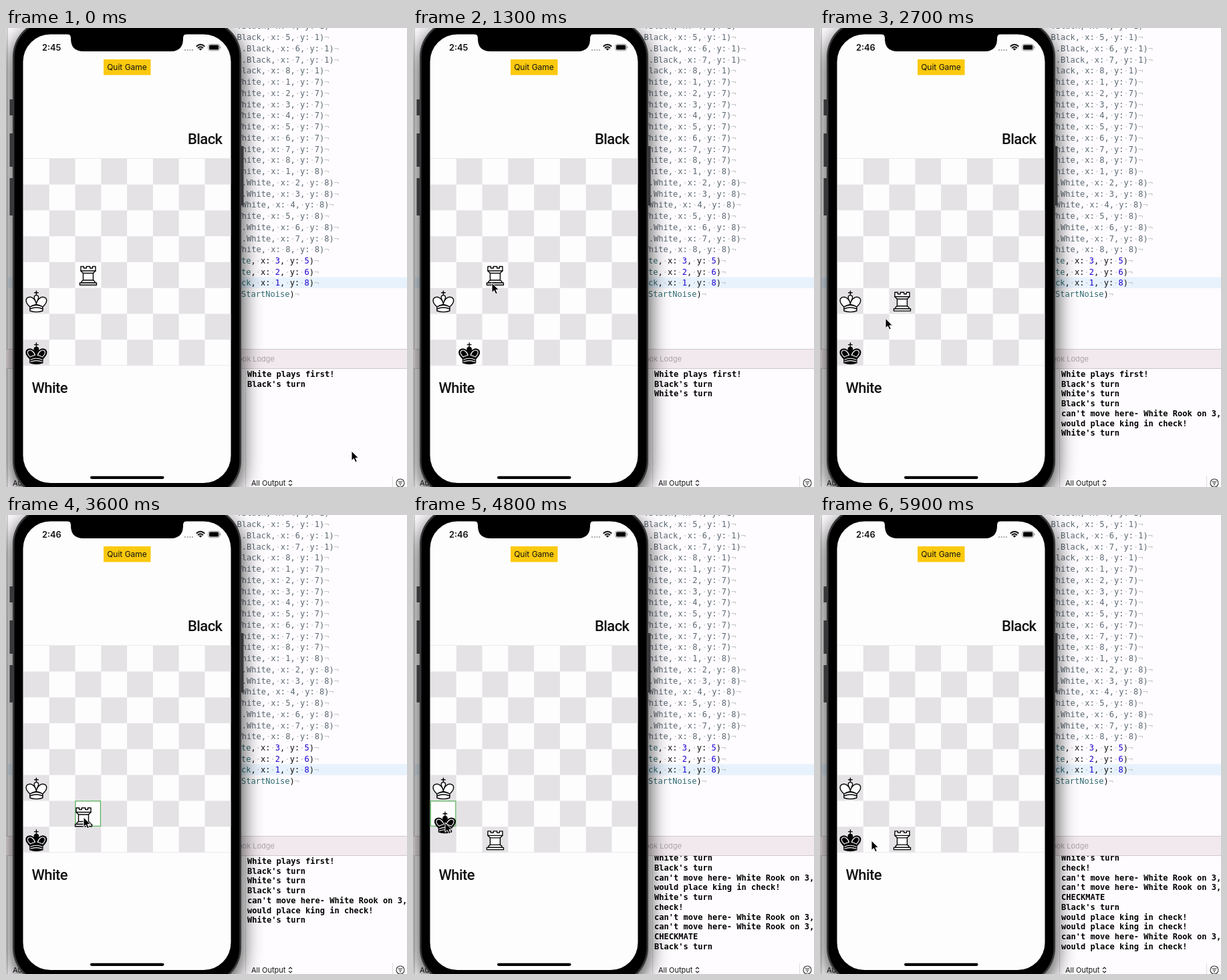
An HTML page for the animation above (6000 ms loop, 600 by 688 pixels).

```html
<!DOCTYPE html>
<html lang="en">
<head>
<meta charset="utf-8">
<title>Chess endgame on a phone</title>
<style>
  html, body { margin: 0; width: 100%; height: 100%; overflow: hidden; background: #fefcfe; }
  svg { display: block; width: 600px; height: 688px; }
  text { font-family: Inter, "Liberation Sans", sans-serif; fill: #111; }
  .code text, .console text { font-family: "DejaVu Sans Mono", "Noto Sans Mono", monospace; font-size: 12.06px; }
  .code text { fill: #5d6974; }
  .code .live { fill: #111; }
  .code .dot { fill: #c3c3c6; }
  .code .num { fill: #1c00cf; }
  .code .type { fill: #326d74; }
  .console text { font-weight: 700; fill: #000; }
  .player { font-family: Roboto, "Open Sans", sans-serif; font-size: 22px; font-weight: 500; letter-spacing: -.6px; }
  .small { font-size: 11px; }
  .line { fill: none; stroke: #000; stroke-width: 1.4; stroke-linejoin: round; stroke-linecap: round; }
  .white { fill: #fff; }
  .black { fill: #000; }
  .inlay { stroke: #fff; stroke-width: 1.1; }
</style>
</head>
<body>
<svg viewBox="0 0 600 688">
  <defs>
    <filter id="blur" x="-30%" y="-20%" width="160%" height="140%"><feGaussianBlur stdDeviation="16"/></filter>
    <clipPath id="consoleClip"><rect x="353" y="511" width="247" height="160"/></clipPath>
    <g id="kingShape">
      <path d="M0-15.8V-9.5M-2.8-13.2H2.8"/>
      <path d="M0 4.5C-.6-1-3.2-3.5-3.2-6A3.2 3.4 0 0 1 3.2-6C3.2-3.5.6-1 0 4.5Z"/>
      <path d="M-9.5 8C-13.5 4.5-15.3 1.5-15.3-1.5C-15.3-6.8-9-8-5.5-5.4C-2.5-3.4-.5-1 0 4.5Q-5 5-9.5 8Z"/>
      <path d="M9.5 8C13.5 4.5 15.3 1.5 15.3-1.5C15.3-6.8 9-8 5.5-5.4C2.5-3.4 .5-1 0 4.5Q5 5 9.5 8Z"/>
      <path d="M-9.5 8Q0 2.6 9.5 8V14Q0 17.2-9.5 14Z"/>
    </g>
  </defs>

  <!-- editor and console -->
  <rect width="600" height="688" fill="#fefcfe"/>
  <rect width="2.5" height="688" fill="#dedcde"/>
  <path d="M2.5 0V688" stroke="#c9c6c9"/>
  <rect x="3" y="373.5" width="597" height="16.5" fill="#e7f2fd"/>
  <g class="code" id="code"></g>
  <rect y="481" width="600" height="29.5" fill="#f1e9ed"/>
  <path d="M0 481.5H600M0 510.5H600" stroke="#d0c9cd"/>
  <path d="M358.5 511V688" stroke="#dedade"/>
  <text x="402" y="500" text-anchor="end" class="small" style="fill:#aaa4a8">Rook Lodge</text>
  <g class="console" id="console" clip-path="url(#consoleClip)"></g>
  <text x="10" y="686" class="small">Auto</text>
  <text x="367" y="686" class="small">All Output</text>
  <path d="M423 680.5l2.5-2.5 2.5 2.5M423 683.5l2.5 2.5 2.5-2.5" fill="none" stroke="#222" stroke-width="1.1"/>
  <path d="M578.5 672V688" stroke="#dedade"/>
  <circle cx="590" cy="682" r="6" fill="none" stroke="#333" stroke-width="1.1"/>
  <path d="M586.5 680H593.5M587.7 682.3H592.3M589 684.6H591" stroke="#333" stroke-width="1.1"/>

  <!-- phone -->
  <rect x="10" y="0" width="342" height="712" rx="55" opacity=".82" filter="url(#blur)"/>
  <path d="M8 107V131M8 158V208M8 225V281" stroke="#37373a" stroke-width="5"/>
  <path d="M353.5 177V266" stroke="#37373a" stroke-width="4"/>
  <rect x="10" y="-12" width="342" height="716" rx="55" fill="#39393b"/>
  <rect x="12.5" y="-9.5" width="337" height="711" rx="53" fill="#000"/>
  <rect x="25.5" y="9.5" width="311" height="672.5" rx="41" fill="#fefdfe"/>
  <path d="M91 9Q97 9 97 15V16Q97 35 116 35H246Q265 35 265 16V15Q265 9 271 9Z"/>
  <text id="clock" x="54" y="33.7" font-size="12.8" font-weight="600"></text>
  <path d="M267 33H280" stroke="#aaa" stroke-width="2" stroke-dasharray="2 1.7"/>
  <path d="M284.7 27.8Q291 21.8 297.3 27.8M287 30.2Q291 26.4 295 30.2" fill="none" stroke="#111" stroke-width="1.9"/>
  <path d="M288.7 31.4Q291 29.6 293.3 31.4L291 33.8Z"/>
  <rect x="302.7" y="24.3" width="16.8" height="9.6" rx="2.8" fill="none" stroke="#999"/>
  <rect x="304" y="25.6" width="14.2" height="7" rx="1.6"/>
  <path d="M320.8 27.5V30.5" stroke="#999" stroke-width="1.2"/>
  <rect x="146" y="47" width="70.5" height="23.5" fill="#fbc90e"/>
  <text x="181" y="63.2" font-size="12" text-anchor="middle">Quit Game</text>
  <text class="player" x="272" y="174">Black</text>
  <text class="player" x="38.5" y="547">White</text>
  <rect x="126" y="671.7" width="110.5" height="4.2" rx="2.1"/>

  <!-- board -->
  <g id="board"></g>
  <path d="M26 195.5H336M26 505.8H336" stroke="#e9e8ea"/>
  <rect id="target" width="37.6" height="37.6" fill="none" stroke="#62b466" stroke-width="1.4"/>
  <g class="line white" transform="translate(45.4 410)">
    <use href="#kingShape"/>
    <path d="M-9.5 11Q0 7 9.5 11" fill="none"/>
  </g>
  <g id="rook" class="line white">
    <path d="M-11-14H-6.5V-11.5H-2.7V-14H2.7V-11.5H6.5V-14H11V-7.5L7.5-4V6.5L10 8.5V10.5H-10V8.5L-7.5 6.5V-4L-11-7.5Z"/>
    <path d="M-12.5 10.5H12.5V13.8H-12.5ZM-11-7.5H11M-7.5-4H7.5M-7.5 6.5H7.5"/>
  </g>
  <g id="king">
    <use href="#kingShape" class="line black"/>
    <g class="line inlay">
      <path d="M-9 5.3C-12 2.7-13.1.4-13.1-1.5C-13.1-4.9-9-5.8-6.4-3.8C-4-2-2.4 0-2 2.7Q-6 3.4-9 5.3Z"/>
      <path d="M9 5.3C12 2.7 13.1.4 13.1-1.5C13.1-4.9 9-5.8 6.4-3.8C4-2 2.4 0 2 2.7Q6 3.4 9 5.3Z"/>
      <path d="M-8.7 9.3Q0 5.4 8.7 9.3M-8.7 12.4Q0 9.2 8.7 12.4"/>
    </g>
  </g>
  <path id="cursor" d="M0 0V14.5L3.4 11.5 5.8 16.8 8.3 15.7 6 10.6H10.5Z" stroke="#fff" stroke-width="1" stroke-linejoin="round"/>
</svg>
<script>
const LOOP = 6000, STEP = 100;
const CELL = 38.78, LEFT = 26, TOP = 195.8;
const CHAR = 7.26;
const byId = id => document.getElementById(id);

function add(parent, tag, attrs, content = "") {
  const el = document.createElementNS("http://www.w3.org/2000/svg", tag);
  for (const key in attrs) el.setAttribute(key, attrs[key]);
  el.innerHTML = content;
  parent.append(el);
  return el;
}

for (let i = 0; i < 64; i++) {
  const col = i % 8, row = i >> 3;
  if ((col + row) % 2) add(byId("board"), "rect",
    { x: LEFT + col * CELL, y: TOP + row * CELL, width: CELL, height: CELL, fill: "#e4e2e5" });
}

// Code listing
const span = (name, text) => `<tspan class="${name}">${text}</tspan>`;
const gap = span("dot", "·");
const codeLine = (i, x, html, name = "") =>
  add(byId("code"), "text", { x, y: 18.2 + i * 16.74, class: name }, html + span("dot", "¬"));
const extra = [0, 2, 2, 1, 0, 2, 2, 0]; // name length beyond four letters

function pieceLine(i, side, x, y) {
  const shift = y === 7 ? 0 : extra[x - 1];
  codeLine(i, 338.3 + shift * CHAR, `.${side}, x: ${x}, y: ${y})`.split(" ").join(gap));
}
for (let x = 4; x <= 8; x++) pieceLine(x - 5, "Black", x, 1);
for (let x = 1; x <= 8; x++) {
  pieceLine(x + 3, "White", x, 7);
  pieceLine(x + 11, "White", x, 8);
}
[["te", 3, 5], ["te", 2, 6], ["ck", 1, 8]].forEach(([end, x, y], i) => {
  codeLine(20 + i, 352, span("type", end) + `,${gap}x:${gap}` + span("num", x)
    + `,${gap}y:${gap}` + span("num", y) + ")", "live");
});
codeLine(23, 352, span("type", "StartNoise") + ")", "live");

// Console output
const LINE = 14.73;
const cant = "can't move here- White Rook on 3, 8";
const would = "would place king in check!";
const output = ["White plays first!", "Black's turn", "White's turn", "Black's turn",
  cant, would, "White's turn", "check!", cant, cant, "CHECKMATE", "Black's turn",
  would, would, cant, would];
const rows = output.map(text => add(byId("console"), "text", { x: 361 }, text));

// Cursor path: step, x, y
const path = [
  [0, 517, 634], [1, 480, 624], [2, 330, 580], [3, 160, 522], [4, 60, 493], [5, 46, 489],
  [7, 82, 487], [9, 83, 486], [10, 94, 462], [12, 115, 393], [13, 118, 382], [15, 119, 376],
  [17, 119, 404], [18, 104, 436], [19, 84, 481], [20, 63, 484], [22, 47, 487], [23, 47, 486],
  [26, 88, 446], [29, 118, 414], [33, 118, 414], [36, 116, 453], [38, 121, 486], [40, 121, 486],
  [44, 56, 484], [45, 56, 484], [48, 48, 461], [49, 48, 466], [50, 52, 478], [52, 76, 452],
  [53, 70, 458], [54, 56, 467], [55, 49, 482], [57, 74, 488], [58, 77, 488], [60, 77, 488]
];

// Drags: piece, lift step, drop step, landing column and row, console lines afterwards
const drags = [
  ["king", 6, 9, 1, 7, 3], ["rook", 16, 18, 2, 5, 4], ["king", 19, 23, 0, 7, 7],
  ["rook", 34, 39, 2, 7, 12], ["king", 46, 49, 0, 7, 13], ["king", 50, 53, 0, 7, 14],
  ["king", 55, 58, 0, 7, 16]
];

function cursorAt(step) {
  const i = path.findIndex(p => p[0] > step);
  const [a, ax, ay] = path[i - 1], [b, bx, by] = path[i];
  const f = (step - a) / (b - a);
  return [ax + (bx - ax) * f, ay + (by - ay) * f];
}

const move = (id, x, y) => byId(id).setAttribute("transform", `translate(${x} ${y})`);

function draw(step) {
  const [cx, cy] = cursorAt(step);
  const home = { king: [0, 7], rook: [2, 4] };
  let lines = 2, held = null;
  for (const [piece, lift, drop, col, row, count] of drags) {
    if (step >= drop) {
      home[piece] = [col, row];
      lines = count;
    } else if (step >= lift) held = piece;
  }

  for (const piece in home) {
    const [col, row] = home[piece];
    if (piece === held) move(piece, cx, cy);
    else move(piece, LEFT + (col + .5) * CELL, TOP + (row + .5) * CELL + 1.2);
  }

  const col = Math.floor((cx - LEFT) / CELL), row = Math.floor((cy - TOP) / CELL);
  const over = held && (col !== home[held][0] || row !== home[held][1]);
  byId("target").style.display = over ? "" : "none";
  move("target", LEFT + col * CELL + .3, TOP + row * CELL + .3);

  const scroll = Math.max(0, (lines - 1) * LINE - 127.7);
  rows.forEach((el, i) => {
    el.setAttribute("y", 523 + i * LINE - scroll);
    el.style.display = i < lines ? "" : "none";
  });
  byId("clock").textContent = step < 26 ? "2:45" : "2:46";
  move("cursor", cx, cy);
}

const start = performance.now();
let last = -1;
function tick() {
  const step = Math.floor((performance.now() - start) % LOOP / STEP);
  if (step !== last) draw(last = step);
  requestAnimationFrame(tick);
}
tick();
</script>
</body>
</html>
```
